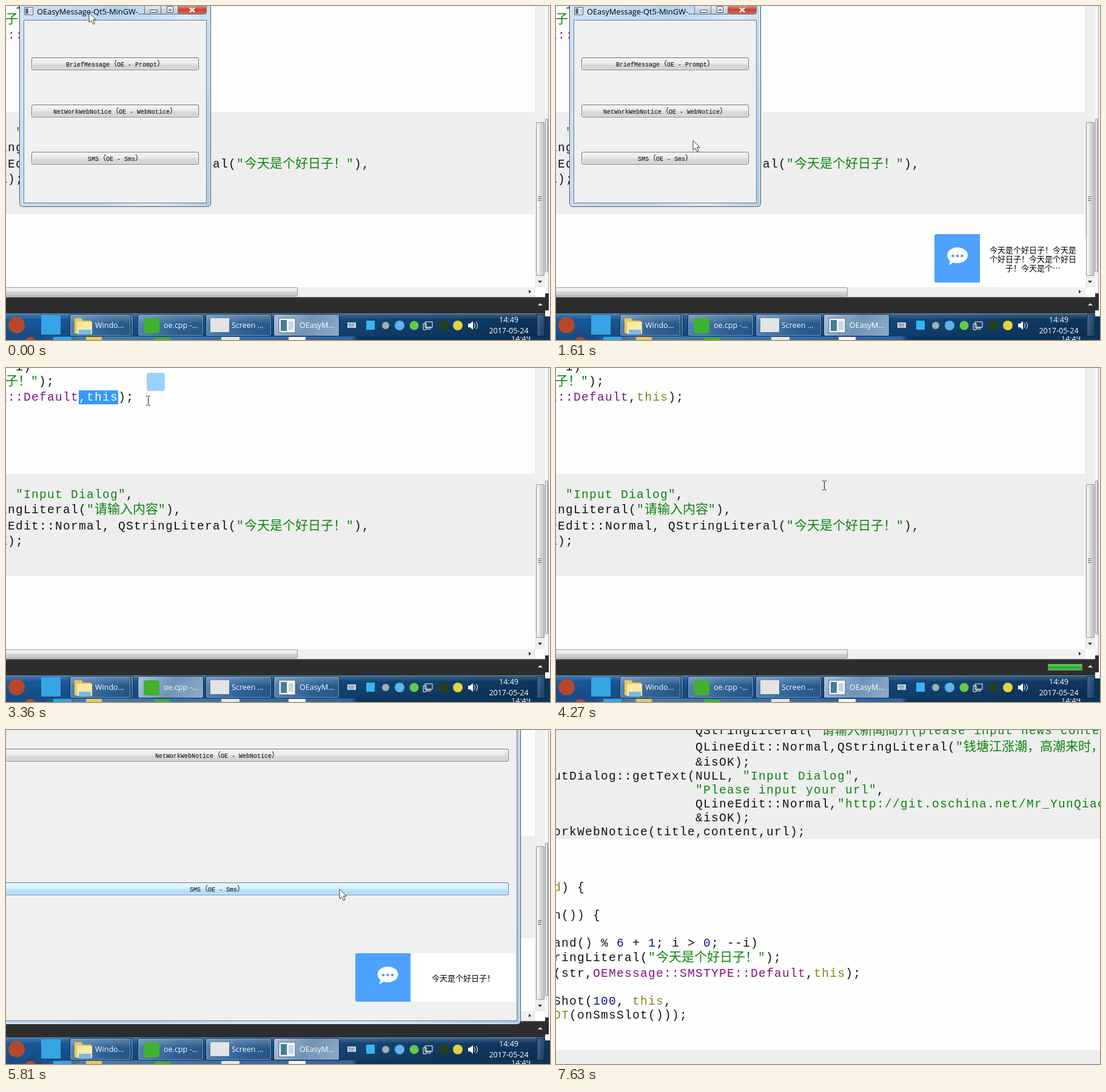
An HTML page that plays this animation: 897 px wide and 552 px high, repeating every 7910 ms.

```html
<!DOCTYPE html>
<html lang="zh">
<head>
<meta charset="utf-8">
<title>Message popups</title>
<style>
html, body { margin: 0; width: 100%; height: 100%; overflow: hidden; background: #fefefe; }
body { position: relative; font: 12.5px "Open Sans", "Noto Sans CJK SC", sans-serif; }
#cam { position: absolute; left: 0; top: 0; width: 897px; height: 552px; }
#cam div, #cam svg, #cam b { position: absolute; box-sizing: border-box; }
#cam b { font-weight: normal; white-space: nowrap; }
i { font-style: normal; }

.band { left: -300px; width: 1172px; background: #eee; }
.code { font: 19.5px/26px "Liberation Mono", "Noto Sans CJK SC", monospace; letter-spacing: 1.3px; white-space: pre; color: #111; }
.code i { font: 300 21px/20px "Noto Sans CJK SC", sans-serif; letter-spacing: 0; }
.str { color: #0a850a; } .kw { color: #868610; } .type { color: #861086; } .num { color: #101086; }
#sel { left: 120px; top: 37px; height: 23px; line-height: 24px; background: #39f; color: #fff; overflow: hidden; }
#tip { left: 232px; top: 8px; width: 30px; height: 30px; border-radius: 4px; background: #9bd2fb; }

.thumb { background: linear-gradient(var(--way, 90deg), #f5f5f5, #e6e6e8 45%, #d2d2d6 55%, #c6c6ca); border: 1px solid #979797; border-radius: 2px; }

.window { background: linear-gradient(100deg, #cfe2f6, #b7d3ee 45%, #d9e9f8 75%, #a9cbea); border: 1px solid #33475c; box-shadow: inset 0 0 0 1px #eef6fd; }
.client { background: #f0f0f0; border: 1px solid #6d7c8d; }
.btn { height: 21px; border: 1px solid #707070; border-radius: 3px; background: linear-gradient(#f3f3f3, #ebebeb 48%, #dddddd 52%, #cfcfcf); box-shadow: inset 0 0 0 1px #fafafa;
  font: 10px/21px "Liberation Mono", monospace; color: #000; text-align: center; white-space: pre; }
.btn i { font: 12px/18px "Noto Sans CJK SC", sans-serif; }
.hot { border-color: #3c7fb1; background: linear-gradient(#eaf6fd, #d9f0fc 48%, #bee6fd 52%, #a7d9f5); }
.cap { height: 16px; top: -2px; border: 1px solid #5c7084; background: linear-gradient(#e3edf7, #b5c9dd); }

.pop { width: 250px; height: 80px; border-radius: 4px; background: linear-gradient(90deg, #4da1ff 75px, #fff 75px); }
.pop svg { left: 20px; top: 22px; }
.pop p { position: absolute; margin: 0; left: 91px; width: 143px; top: 50%; transform: translateY(-50%);
  font: 13px/15px "Noto Sans CJK SC", sans-serif; text-align: center; line-break: anywhere; color: #000; }

#bar { left: 0; top: 508px; width: 889px; height: 38px; color: #fff; border-top: 1px solid #5f8db8;
  background: linear-gradient(#fff3, #fff0 25%, #0002), linear-gradient(90deg, #19599a, #154a80 55%, #0d3459); }
.task { top: 0; height: 37px; border: 1px solid #0b2747; border-radius: 3px; box-shadow: inset 0 0 0 1px #7ca3c8;
  background: linear-gradient(#fff4, #fff0 45%), linear-gradient(100deg, #5584b1, #2c5f94 60%, #265586); }
.lit { background: linear-gradient(120deg, #a9c3da, #6f94b7 50%, #8eabc6); }
.task b { left: 42px; top: 9px; }
.dot { border-radius: 50%; }
</style>
</head>
<body>
<div id="cam">
  <div class="band" style="top:-354px;height:180px"></div>
  <div class="band" style="top:175px;height:169px"></div>
  <div id="code"></div>
  <div id="sel" class="code">,this</div>
  <div id="tip"></div>

  <div style="left:873px;top:0;width:16px;height:465px;background:#efefef;border-left:1px solid #ddd"></div>
  <div class="thumb" style="left:874px;top:192px;width:14px;height:254px"></div>
  <div style="left:877px;top:315px;width:6px;height:8px;background:repeating-linear-gradient(#555 0 1px,#eee 1px 3px)"></div>
  <div style="left:889px;top:0;width:8px;height:552px;background:#f6f6f6"></div>
  <div class="thumb" style="left:889px;top:186px;width:5px;height:254px"></div>
  <div style="left:894px;top:0;width:1px;height:475px;background:#aaa"></div>
  <div style="left:0;top:465px;width:873px;height:16px;background:#efefef"></div>
  <div class="thumb" style="--way:180deg;left:-9px;top:465px;width:490px;height:15px"></div>
  <div style="left:0;top:481px;width:889px;height:27px;background:#2d2d2d;border-top:2px solid #444"></div>
  <div style="left:889px;top:475px;width:6px;height:28px;background:#2d2d2d"></div>
  <div style="left:889px;top:513px;width:8px;height:34px;background:#0d3459"></div>
  <svg width="897" height="552" style="left:0;top:0">
    <path d="M862 469l4 3-4 3zM877 454h7l-3.5 4z" fill="#333"/><path d="M877 495h8l-4-4z" fill="#ddd"/>
  </svg>
  <div id="build" style="left:811px;top:489px;width:57px;height:11px;border:1px solid #777;background:linear-gradient(#6fd96f,#27a827 50%,#4dc34d)"></div>

  <div id="small" class="window" style="left:22px;top:-14px;width:316px;height:346px;border-radius:6px">
    <svg width="16" height="14" style="left:7px;top:15px"><path d="M.5.5h14v12H.5z" fill="#fff" stroke="#555"/><path d="M2 2h5v9H2z" fill="#47749b"/><path d="M9 3h4v7H9z" fill="#bcd"/></svg>
    <b style="left:28px;top:13px;font-size:12.8px">OEasyMessage-Qt5-MinGW-...</b>
    <div class="cap" style="left:205px;top:11px;width:28px"></div>
    <div class="cap" style="left:232px;top:11px;width:29px"></div>
    <div class="cap" style="left:260px;top:11px;width:48px;border-radius:0 0 4px 4px;background:linear-gradient(#e2a18f,#c2452c 50%,#d9694a)"></div>
    <svg width="100" height="20" style="left:206px;top:8px"><path d="M9 11.500h11v4h-11zM36.500 5.500h10v10h-10zM39.500 10.500h4v2h-4z" fill="#fff" stroke="#445"/><path d="M74 8l8 7m0-7l-8 7" stroke="#fff" stroke-width="2.500"/></svg>
    <div class="client" style="left:6px;top:36px;width:302px;height:303px;background:#eef0f2"></div>
  </div>
  <div id="desk" style="left:0;top:0;width:889px;height:508px;overflow:hidden"></div>

  <div id="large" class="window" style="left:-200px;top:-100px;width:1049px;height:587px;border-radius:6px">
    <div class="client" style="left:20px;top:20px;width:1022px;height:560px"></div>
    <div id="inner" style="left:199px;top:99px;width:841px;height:479px;overflow:hidden"></div>
  </div>

  <div id="bar">
    <div class="dot" style="left:4px;top:5px;width:27px;height:27px;background:#b5482c"></div>
    <div style="left:58px;top:2px;width:32px;height:32px;background:#35a5e5"></div>
    <div class="task" style="left:109px;width:101px"></div>
    <div class="task" style="left:105px;width:101px">
      <svg width="34" height="32" style="left:5px;top:3px"><path d="M2 3h11l3 4h13v21H2z" fill="#e9c65f"/><path d="M6 9h25v20H6z" fill="#fbe9a0"/><path d="M9 22h20v8H9z" fill="#79b9e6"/></svg>
      <b style="left:41px">Windo...</b></div>
    <div id="editTask" class="task" style="left:217px;width:109px"><div style="left:9px;top:6px;width:26px;height:25px;border-radius:4px;background:#41b130"></div><b>oe.cpp -...</b></div>
    <div class="task" style="left:329px;width:109px"><div style="left:7px;top:6px;width:31px;height:23px;background:#e4e4e4"></div><b>Screen ...</b></div>
    <div id="appTask" class="task" style="left:441px;width:109px">
      <svg width="30" height="28" style="left:7px;top:5px"><path d="M1 1h27v24H1z" fill="#f5f8fa" stroke="#567"/><path d="M4 4h10v18H4z" fill="#477b94"/><path d="M17 6h8v14h-8z" fill="#ccd6df"/></svg><b>OEasyM...</b></div>
    <svg width="230" height="38" style="left:555px;top:0">
      <path d="M8 14h14v9H8z" fill="#cfd9e3"/><path d="M10 16.500h10M10 18.500h10M11 21h8" stroke="#234" stroke-dasharray="1.500 1"/>
      <path d="M39 11h14v15H39z" fill="#35b6f2"/><circle cx="71" cy="19" r="6" fill="#9fb0ae"/>
      <circle cx="94" cy="19" r="8" fill="#5bb4ec"/><circle cx="118" cy="19" r="7.500" fill="#67c944"/>
      <path d="M136 13h12v9h-12zM133 16h5v10h-5zM140 22h5v3h-5z" fill="#193d62" stroke="#fff"/>
      <path d="M159 11h15v15h-15z" fill="#26401b"/><circle cx="190" cy="19" r="8" fill="#e6d33b"/>
      <path d="M207 16h3l5-4v14l-5-4h-3z" fill="#fff"/><path d="M217 15q3 4 0 8m3-10q5 6 0 12" fill="none" stroke="#fff"/>
    </svg>
    <b style="left:789px;width:80px;top:1px;text-align:center;line-height:18px">14:49<br>2017-05-24</b>
    <div style="left:875px;top:0;width:14px;height:37px;border:1px solid #0b2747;background:linear-gradient(100deg,#46698b,#173b61)"></div>
  </div>
  <div style="left:0;top:546px;width:897px;height:6px;overflow:hidden;color:#fff;background:linear-gradient(90deg,#1b4d80 60px,#4c7ba6 125px,#35639a 570px,#0d3459 580px)">
    <div class="dot" style="left:30px;top:1px;width:20px;height:20px;background:#b5482c"></div>
    <div style="left:78px;top:1px;width:30px;height:9px;background:#35a5e5"></div>
    <div style="left:132px;top:1px;width:26px;height:9px;background:#e9c65f"></div>
    <div style="left:245px;top:2px;width:26px;height:9px;background:#41b130"></div>
    <div style="left:355px;top:1px;width:30px;height:9px;background:#e4e4e4"></div>
    <div style="left:466px;top:1px;width:28px;height:9px;background:#f5f8fa"></div>
    <b style="left:833px;top:-5px">14:49</b>
  </div>

  <div id="cursor" style="left:0;top:0">
    <svg id="arrow" width="16" height="24" style="left:-1px;top:-1px"><path d="M1 1v16l3.700-3.400 2.800 6.200 2.700-1.200-2.800-6h5z" fill="#fff" stroke="#333"/></svg>
    <svg id="beam" width="9" height="18" style="left:-4px;top:-9px"><path d="M1 1.500h2.500l1 1 1-1H8M4.500 2v14M1 16.500h2.500l1-1 1 1H8" fill="none" stroke="#222"/></svg>
  </div>
</div>

<script>
const LOOP = 7910, SLIDE = 290, CELL = 13, LEFT = -296;
const $ = id => document.getElementById(id);
const wide = s => s.replace(/[^\x00-\xff]+/g, '<i>$&</i>');

function add(parent, cls, css, html) {
  const node = document.createElement('div');
  node.className = cls;
  node.style.cssText = css;
  node.innerHTML = html;
  parent.append(node);
  return node;
}

// Stops are [ms, value]; the last value holds until the loop restarts.
function track(node, prop, stops, easing = 'linear') {
  const keys = stops.map(([ms, value]) => ({ offset: ms / LOOP, [prop]: value, easing }));
  keys.push({ offset: 1, [prop]: stops.at(-1)[1] });
  node.animate(keys, { duration: LOOP, iterations: Infinity });
}
const show = (node, ...stops) => track(node, 'opacity', stops, 'step-end');
const fade = (node, ...stops) => track(node, 'opacity', stops);

const tokens = /("[^"]*"?)|(^d\b|^OT\b|\bthis\b)|(OEMessage|SMSTYPE|Default|::(?=SMS|Def))|(\b\d+\b)/g;
const kinds = ['str', 'kw', 'type', 'num'];
const paint = text => text.replace(/&/g, '&amp;').replace(tokens, (m, ...groups) =>
  `<span class=${kinds[groups.slice(0, 4).findIndex(Boolean)]}>${wide(m)}</span>`);

// [column, centre y, text]
[
  [18, -354, 'QStringLiteral("请输入新闻简介(please input news content)"),'],
  [18, -327, 'QLineEdit::Normal,QStringLiteral("钱塘江涨潮，高潮来时，"),'],
  [18, -301, '&isOK);'],
  [0, -278, 'utDialog::getText(NULL, "Input Dialog",'],
  [18, -255, '"Please input your url",'],
  [18, -232, 'QLineEdit::Normal,"http://git.oschina.net/Mr_YunQiaoBo",'],
  [18, -209, '&isOK);'],
  [0, -186, 'orkWebNotice(title,content,url);'],
  [0, -94, 'd) {'],
  [0, -48, 'n()) {'],
  [0, -2, 'and() % 6 + 1; i > 0; --i)'],
  [0, 21, 'ringLiteral("今天是个好日子！");'],
  [0, 48, '(str,OEMessage::SMSTYPE::Default,this);'],
  [0, 94, 'Shot(100, this,'],
  [0, 117, 'OT(onSmsSlot()));'],
  [0, 209, 'utDialog::getText(NULL, "Input Dialog",'],
  [18, 233, 'QStringLiteral("请输入内容"),'],
  [18, 260, 'QLineEdit::Normal, QStringLiteral("今天是个好日子！"),'],
  [18, 286, '&isOK);'],
].forEach(([col, y, text]) =>
  add($('code'), 'code', `left:${LEFT + col * CELL}px;top:${y - 12}px`, paint(text)));

function button(parent, x, y, width, text, ...hot) {
  const css = `left:${x}px;top:${y}px;width:${width}px`;
  add(parent, 'btn', css, wide(text));
  if (hot.length) fade(add(parent, 'btn hot', css, wide(text)), ...hot);
}
const labels = ['BriefMessage（OE - Prompt）', 'NetWorkWebNotice（OE - WebNotice）', 'SMS（OE - Sms）'];
const smallHover = [[0, 0], [350, 0], [420, 1], [1330, 1], [1470, 0], [1750, 0], [1820, 1], [2030, 1], [2170, 0]];
const largeHover = [[0, 0], [4480, 0], [4620, 1], [6160, 1], [6370, 0]];
labels.forEach((label, i) => button($('small'), 19, 98 + 78 * i, 276, label, ...(i == 2 ? smallHover : [])));
button($('inner'), -133, 31, 962, labels[1]);
button($('inner'), -133, 252, 962, labels[2], ...largeHover);

const bubble = `<svg width="36" height="32"><path d="M18 0c9.500 0 17 5.500 17 13s-7.500 13-17 13q-4 0-7-1-4 3.500-8 3.500 3-3 2.500-6.500Q1 18 1 13C1 5.500 8.500 0 18 0z" fill="#fff"/>
<g fill="#4da1ff"><circle cx="10.500" cy="14" r="2.300"/><circle cx="18" cy="14" r="2.300"/><circle cx="25.500" cy="14" r="2.300"/></g></svg>`;
const greeting = '今天是个好日子！';
function popup(layer, x, y, start, times) {
  const text = times > 3 ? greeting.repeat(3) + '今天是个…' : greeting.repeat(times);
  const node = add(layer, 'pop', `left:${x}px;top:${y}px`, `${bubble}<p>${text}</p>`);
  track(node, 'transform', [[0, 'translateX(265px)'], [start, 'translateX(265px)'], [start + SLIDE, 'none']]);
}
[[530, 2], [800, 3], [1050, 5], [1800, 1], [2080, 4]].forEach(p => popup($('desk'), 624, 377, ...p));
[[4690, 5], [4980, 2], [5260, 4], [5538, 1], [6090, 2], [6350, 3]].forEach(p => popup($('inner'), 576, 369, ...p));

fade($('small'), [0, 1], [2450, 1], [2590, 0]);
fade($('desk'), [0, 1], [2900, 1], [3340, 0]);
fade($('large'), [0, 0], [4270, 0], [4450, 1], [6790, 1], [6930, 0]);
fade($('tip'), [0, 0], [3220, 0], [3290, 1], [3640, 1], [3780, 0]);
show($('build'), [0, 0], [3780, 1], [5460, 0]);
track($('sel'), 'width', [[0, '0px'], [2940, '0px'], [3150, '65px'], [3850, '65px'], [3851, '0px']]);

function light(task, ...stops) {
  const glow = add(task, 'lit', 'left:0;top:0;width:107px;height:35px;border-radius:3px', '');
  task.prepend(glow);
  show(glow, ...stops);
}
light($('appTask'), [0, 1], [2520, 0], [4270, 1], [6860, 0]);
light($('editTask'), [0, 0], [2520, 1], [4270, 0], [6860, 1]);

track($('cursor'), 'transform', [
  [0, 137, 11], [70, 145, 30], [420, 226, 250], [1050, 226, 250], [1260, 230, 190], [1400, 226, 222], [1610, 226, 222],
  [1780, 215, 250], [2000, 215, 250], [2380, 307, 5], [2520, 307, 5], [2660, 397, 11], [2920, 120, 50],
  [3150, 185, 50], [3290, 234, 54], [3500, 234, 54], [4200, 420, 180], [4620, 550, 263], [6090, 550, 263], [6440, 500, 560],
].map(([ms, x, y]) => [ms, `translate(${x}px,${y}px)`]));
show($('cursor'), [0, 1], [6440, 0]);
show($('arrow'), [0, 1], [2590, 0], [4340, 1]);
show($('beam'), [0, 0], [2590, 1], [4340, 0]);

track($('cam'), 'transform', [[0, 'translate(0px,0px)'], [7070, 'translate(0px,0px)'], [7630, 'translate(292px,354px)']], 'ease-in-out');
</script>
</body>
</html>
```
